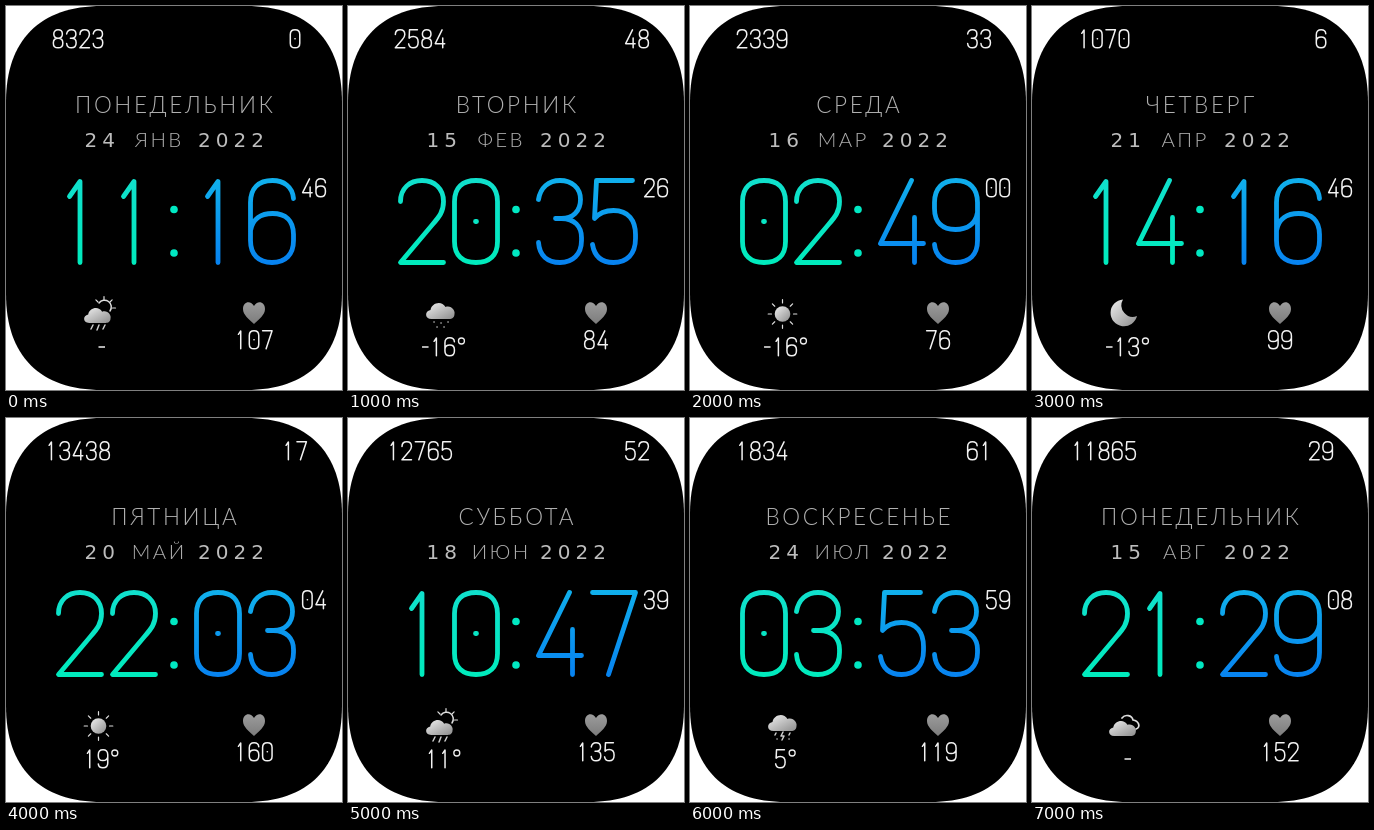
These frames come from a looping animation (336 px wide and 384 px high, 8000 ms). An HTML page:

```html
<!DOCTYPE html>
<html lang="ru">
<head>
<meta charset="utf-8">
<title>Watch face</title>
<style>
  html, body { margin: 0; width: 100%; height: 100%; overflow: hidden; background: #fff; }
  svg { display: block; width: 336px; height: 384px; }
  .day, .month { font-family: Lato, Inter, "Open Sans", sans-serif; font-weight: 300; fill: #b0b0b0; text-anchor: middle; }
  .day { font-size: 22.5px; letter-spacing: 2.6px; }
  .month { font-size: 20.5px; letter-spacing: 2.4px; }
  .num { font: 20px "DejaVu Sans", sans-serif; letter-spacing: 5px; fill: #bdbdbd; }
  .stroke { fill: none; stroke-linecap: round; stroke-linejoin: round; }
</style>
</head>
<body>
<svg viewBox="0 0 336 384" xmlns="http://www.w3.org/2000/svg">
  <defs>
    <linearGradient id="teal" gradientUnits="userSpaceOnUse" x1="0" y1="0" x2="0" y2="82">
      <stop offset="0" stop-color="#10e0cc"/><stop offset="1" stop-color="#00ebbd"/>
    </linearGradient>
    <linearGradient id="blue" gradientUnits="userSpaceOnUse" x1="6" y1="0" x2="20" y2="82">
      <stop offset="0" stop-color="#10b0ec"/><stop offset="1" stop-color="#0783f0"/>
    </linearGradient>
    <linearGradient id="gray" x1="0" y1="0" x2="1" y2="1">
      <stop offset="0" stop-color="#f0f0f0"/><stop offset="1" stop-color="#8c8c8c"/>
    </linearGradient>
    <linearGradient id="dim" x1="0" y1="0" x2="0" y2="1">
      <stop offset="0" stop-color="#9c9c9c"/><stop offset="1" stop-color="#7c7c7c"/>
    </linearGradient>
  </defs>
  <path d="M0 96C0 34 34 0 96 0H240C302 0 336 34 336 96V288C336 350 302 384 240 384H96C34 384 0 350 0 288Z"/>
  <g fill="#00e8c2"><circle cx="168" cy="203.5" r="3.8"/><circle cx="168" cy="247" r="3.8"/></g>
  <path fill="url(#dim)" d="M248 318C243 313 237 309 237 303C237 295 245 294 248 300C251 294 259 295 259 303C259 309 253 313 248 318Z"/>
  <g id="face"></g>
</svg>
<script>
const face = document.getElementById('face');

// Digit centre lines in a 43 x 82 cell
const glyphs = [
  'M0 21C0 7 8 0 21.5 0S43 7 43 21V61C43 75 35 82 21.5 82S0 75 0 61ZM21 41H22',
  'M11 16L21.5 1V82',
  'M0 21C0 8 9 0 21.5 0S43 8 43 21C43 31 39 36 32 44L0 82H43',
  'M0 19C2 7 10 0 21.5 0S42 7 42 19S34 38 23 38H17M23 38C36 38 43 46 43 57V60C43 74 34 82 21.5 82S1 75 0 62',
  'M31 0L0 63H43M34 37V82',
  'M40 0H4L2 38C7 32 13 30 21 30C36 30 43 40 43 54V58C43 74 34 82 21 82C9 82 2 76 0 64',
  'M43 18C42 6 33 0 22 0C8 0 0 8 0 22V60C0 74 8 82 21.5 82S43 74 43 60V54C43 40 35 33 22 33C11 33 2 38 0 50',
  'M0 0H43L16 82',
  'M21.5 38C9 38 2 30 2 19S9 0 21.5 0S41 8 41 19S34 38 21.5 38C8 38 0 46 0 59V61C0 74 8 82 21.5 82S43 74 43 61V59C43 46 35 38 21.5 38Z',
  'M0 64C1 76 10 82 21 82C35 82 43 74 43 60V22C43 8 35 0 21.5 0S0 8 0 22V28C0 42 8 49 21 49C32 49 41 44 43 32'
];

function digit(ch, x, y, scale, color, width) {
  return `<path class="stroke" d="${glyphs[ch]}" transform="translate(${x} ${y}) scale(${scale})" stroke="${color}" stroke-width="${width}"/>`;
}

const big = (ch, x, color) => digit(ch, x + 2.5, 174.5, 1, `url(#${color})`, 4.8);

const partWidth = { '-': 7, '°': 8 };
const wide = ch => partWidth[ch] || 11;
const gap = 2.3;

// Small numbers, centred on cx, with their top edge at y
function small(str, cx, y) {
  const chars = [...str];
  let x = cx - (chars.reduce((sum, ch) => sum + wide(ch) + gap, 0) - gap) / 2;
  return chars.map(ch => {
    const left = x;
    x += wide(ch) + gap;
    if (ch === '-') return `<path d="M${left + .5} ${y + 10}h6.5" stroke="#eee" stroke-width="1.5"/>`;
    if (ch === '°') return `<circle cx="${left + 4}" cy="${y + 4}" r="3" fill="none" stroke="#eee" stroke-width="1.3"/>`;
    return digit(ch, left + .8, y + .8, .22, '#f2f2f2', 6.8);
  }).join('');
}

const rays = (cx, cy, r1, r2, from = 0, to = 8) => {
  let d = '';
  for (let i = from; i < to; i++) {
    const a = i * Math.PI / 4, c = Math.cos(a), s = Math.sin(a);
    d += `M${cx + c * r1} ${cy + s * r1}L${cx + c * r2} ${cy + s * r2}`;
  }
  return `<path class="stroke" d="${d}" stroke="#ddd" stroke-width="1.2"/>`;
};

const cloud = (x, y, k = 1) =>
  `<path transform="translate(${x} ${y}) scale(${k})" fill="url(#gray)" d="M5 16C-2 16-2 8 4 7C5 0 15-3 19 4C25 2 29 8 28 11C28 15 25 16 23 16Z"/>`;

const lines = d => `<path class="stroke" d="${d}" stroke="#ccc" stroke-width="1.5"/>`;

const weather = {
  sun: () => '<circle cx="92.5" cy="308" r="7.8" fill="url(#gray)"/>' + rays(92.5, 308, 11, 14.3),
  moon: () => '<path fill="url(#gray)" d="M91 293.5A13.4 13.4 0 1 0 105 310A11.5 11.5 0 0 1 91 293.5Z"/>',
  sunRain: () => rays(98, 302, 8.5, 11.5, 5, 9) +
    '<path class="stroke" d="M93 297A6.5 6.5 0 0 1 104 305" stroke="#ddd" stroke-width="1.5"/>' +
    cloud(78.5, 302, .93) + lines('M87 319l-2 4M93 319l-2 5M99 319l-2 4'),
  storm: () => cloud(78.5, 297) + lines('M86 315l-1 2M93 314l-2 4h3l-2 4M100 315l-1 2M87 321h.1M99 321h.1'),
  snow: () => cloud(78.5, 297) + lines('M86 316h.1M93 317h.1M100 316h.1M89 321h.1M96 321h.1'),
  clouds: () => '<path class="stroke" d="M90 300C93 296 100 297 101 302C107 303 109 309 104 311" stroke="#ddd" stroke-width="1.7"/>' +
    cloud(77.5, 303, .94)
};

// steps, battery, weekday, date, month, hhmm, seconds, weather, temperature, pulse
const states = [
  ['8323', '0', 'ПОНЕДЕЛЬНИК', '24', 'ЯНВ', '1116', '46', 'sunRain', '-', '107'],
  ['2584', '48', 'ВТОРНИК', '15', 'ФЕВ', '2035', '26', 'snow', '-16°', '84'],
  ['2339', '33', 'СРЕДА', '16', 'МАР', '0249', '00', 'sun', '-16°', '76'],
  ['1070', '6', 'ЧЕТВЕРГ', '21', 'АПР', '1416', '46', 'moon', '-13°', '99'],
  ['13438', '17', 'ПЯТНИЦА', '20', 'МАЙ', '2203', '04', 'sun', '19°', '160'],
  ['12765', '52', 'СУББОТА', '18', 'ИЮН', '1047', '39', 'sunRain', '11°', '135'],
  ['1834', '61', 'ВОСКРЕСЕНЬЕ', '24', 'ИЮЛ', '0353', '59', 'storm', '5°', '119'],
  ['11865', '29', 'ПОНЕДЕЛЬНИК', '15', 'АВГ', '2129', '08', 'clouds', '-', '152']
];

const cellX = [50, 104, 188, 242];

function draw([steps, battery, day, date, month, time, sec, icon, temp, pulse]) {
  face.innerHTML =
    small(steps, 72, 23) + small(battery, 289, 23) +
    `<text class="day" x="169.3" y="107">${day}</text>` +
    `<text class="num" x="78.5" y="141">${date}</text>` +
    `<text class="month" x="153.2" y="141">${month}</text>` +
    `<text class="num" x="192" y="141">2022</text>` +
    [...time].map((ch, i) => big(ch, cellX[i], i < 2 ? 'teal' : 'blue')).join('') +
    small(sec, 308, 172) + weather[icon]() +
    small(temp, 95.5, 331) + small(pulse, 248, 324);
}

let shown = -1;
function tick() {
  const index = Math.floor(performance.now() % 8000 / 1000);
  if (index !== shown) draw(states[shown = index]);
  requestAnimationFrame(tick);
}
tick();
</script>
</body>
</html>
```
